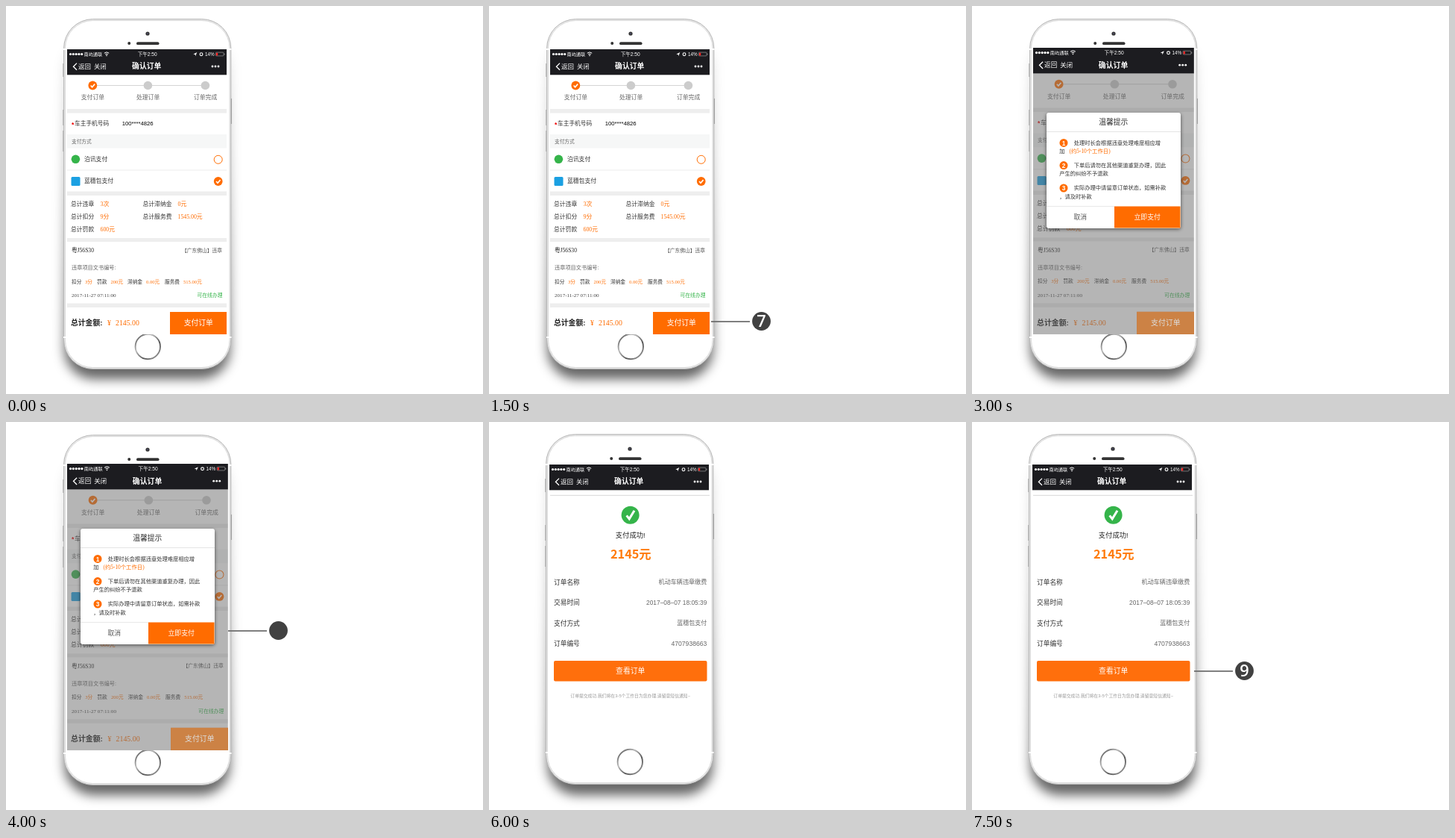
These frames come from a looping animation (640 px wide and 520 px high, 8 s). An HTML page:

```html
<!DOCTYPE html>
<html>
<head>
<meta charset="utf-8">
<style>
html, body { margin: 0; width: 100%; height: 100%; overflow: hidden; background: #fff; }
svg { display: block; }
text { font-family: "Liberation Sans", "Noto Sans CJK SC", "Noto Sans CJK", sans-serif; white-space: pre; }
.serif { font-family: "Liberation Serif", "Noto Sans CJK SC", "Noto Sans CJK", serif; }
.cjk { font-family: "Noto Sans CJK SC", "Noto Sans CJK", sans-serif; }
.digit { font-family: "Open Sans", "Noto Sans", sans-serif; font-weight: 600; }
</style>
</head>
<body>
<svg id="stage" width="640" height="520" viewBox="0 0 640 520"></svg>
<script>
const ORANGE = '#ff6c00', GREEN = '#35b44a', LOOP = 8000;

// y is the middle of the line of text
const text = (x, y, str, size, fill = '#333', anchor = 'start', cls = '', weight = 400) =>
  `<text x="${x}" y="${y + size * .37}" font-size="${size}" fill="${fill}" text-anchor="${anchor}" class="${cls}" font-weight="${weight}">${str}</text>`;
const mid = (x, y, str, size, fill, cls, weight) => text(x, y, str, size, fill, 'middle', cls, weight);
const end = (x, y, str, size, fill, cls) => text(x, y, str, size, fill, 'end', cls);
const price = (x, y, str, size) => text(x, y, str, size, ORANGE, 'start', 'serif');
const rect = (x, y, w, h, fill, extra = '') =>
  `<rect x="${x}" y="${y}" width="${w}" height="${h}" fill="${fill}" ${extra}/>`;
const dot = (x, y, r, fill, extra = '') => `<circle cx="${x}" cy="${y}" r="${r}" fill="${fill}" ${extra}/>`;
const path = (d, stroke, width, extra = '') =>
  `<path d="${d}" fill="none" stroke="${stroke}" stroke-width="${width}" ${extra}/>`;
const tick = (x, y, r, fill) => dot(x, y, r, fill) +
  path(`M${x - r * .45} ${y}l${r * .33} ${r * .38}l${r * .6} ${-r * .7}`, '#fff', r * .27);
const during = (from, to, content) => `<g data-from="${from}" data-to="${to}" display="none">${content}</g>`;
const move = (x, y, content) => `<g transform="translate(${x} ${y})">${content}</g>`;

const defs = `<defs>
  <filter id="blur" x="-20%" y="-20%" width="140%" height="140%"><feGaussianBlur stdDeviation="7.5"/></filter>
  <filter id="soft" x="-10%" y="-10%" width="120%" height="120%"><feGaussianBlur stdDeviation="2.5"/></filter>
  <linearGradient id="ring" x2="1" y2="1"><stop stop-color="#444"/><stop offset=".35" stop-color="#bbb"/>
    <stop offset=".65" stop-color="#555"/><stop offset="1" stop-color="#aaa"/></linearGradient>
  <linearGradient id="shade" x2="0" y2="1"><stop stop-opacity=".08"/><stop offset=".4" stop-opacity=".26"/>
    <stop offset="1" stop-opacity=".62"/></linearGradient>
</defs>`;

const shadow = rect(78, 44, 223, 456, 'url(#shade)', 'rx="40" filter="url(#blur)"');

const phone = [[77, 18], [139, 21], [167, 28]].map(([y, h]) => rect(76.3, y, 2, h, '#aaa')).join('') +
  rect(301, 124, 2, 34, '#999') +
  rect(77.6, 17.6, 224.2, 468.8, '#ececec', 'rx="39" stroke="#b4b4b4" stroke-width="1"') +
  rect(79.5, 19.5, 220.5, 465, '#fff', 'rx="37" stroke="#d2d2d2" stroke-width=".8"') +
  [57, 443].map(y => rect(77, y, 4, 2, '#fff') + rect(298.5, y, 4, 2, '#fff')).join('') +
  dot(190, 37, 2.6, '#333') + dot(190, 37, .9, '#557') + dot(165.2, 50, 2, '#333') +
  rect(175, 48.3, 30.5, 3.8, '#333', 'rx="1.9"') +
  dot(190.3, 456.5, 16.7, '#fff', 'stroke="url(#ring)" stroke-width="1.9"');

const header = rect(82, 58, 214, 34.3, '#1c1c20') +
  [0, 1, 2, 3, 4].map(i => dot(86.5 + i * 3.8, 64.5, 1.6, '#fff')).join('') +
  text(104.5, 64.5, '南屿通联', 6.2, '#fff') +
  path('M131.8 63.2q3.2 -2.6 6.4 0M133.2 64.9q1.8 -1.5 3.6 0', '#fff', 1) + dot(135, 66.4, .8, '#fff') +
  mid(189.7, 64.5, '下午2:50', 6.6, '#fff') +
  '<path d="M251.3 64.6l5 -2.5l-2.2 5.2l-.4 -2.4z" fill="#fff"/>' +
  dot(262, 64.7, 1.9, 'none', 'stroke="#fff" stroke-width="1.1"') +
  text(267, 64.5, '14%', 6.3, '#fff') +
  rect(281.4, 62.2, 10.6, 4.7, 'none', 'rx="1" stroke="#aaa" stroke-width=".6"') +
  rect(282, 62.8, 2.2, 3.5, '#f22') + rect(292.6, 63.6, .8, 2, '#aaa') +
  path('M95 76.6l-4.6 4.6l4.6 4.6', '#fff', 1.3) +
  text(97, 81, '返回', 8.5, '#fff') + text(118, 81, '关闭', 8.3, '#fff') +
  mid(188.7, 80.8, '确认订单', 9.8, '#fff', 'cjk', 700) +
  [277, 281, 285].map(x => dot(x, 81, 1.4, '#fff')).join('');

const payButton = (fill, ink) => rect(220, 410, 76, 30, fill) + mid(258.3, 424.8, '支付订单', 9.8, ink);

const bands = [[138, 5.5], [248.5, 5.5], [311, 5], [398.5, 5.5]]
  .map(([y, h]) => rect(82, y, 214, h, '#eee')).join('');

const steps = path('M122 106.5H262', '#d4d4d4', 1) + tick(116.3, 106.5, 5.9, ORANGE) +
  dot(190.4, 106.5, 5.8, '#ccc') + dot(267.4, 106.5, 5.8, '#ccc') +
  ['支付订单', '处理订单', '订单完成'].map((s, i) => mid([116.4, 190.6, 267.6][i], 122.5, s, 7.8, '#666')).join('');

const method = text(88, 158.5, '*', 8.5, '#e00', 'start', '', 700) + text(92, 157.5, '车主手机号码', 7.7) +
  text(155.7, 157.5, '100****4826', 7.7, '#000') +
  rect(82, 172, 214, 18.5, '#f6f7f7') + text(88, 181.3, '支付方式', 6.7, '#666') +
  dot(93.4, 205.3, 5.8, GREEN) + text(105, 205, '泊讯支付', 7.8) +
  dot(284.7, 205.8, 5.5, '#fff', `stroke="${ORANGE}" stroke-width="1"`) +
  rect(82, 219.5, 214, 1, '#eee') +
  rect(87.5, 229, 12, 12, '#1ba0e2', 'rx="1.5"') + text(105, 234.3, '蓝穗包支付', 7.8) +
  tick(284.7, 235, 5.9, ORANGE);

const totals = [['违章', '3次'], ['扣分', '9分'], ['罚款', '600元']].map(([label, v], i) =>
    text(87, 265.3 + i * 17, '总计' + label, 7.8) + price(126.5, 265.3 + i * 17, v, 7.8)).join('') +
  [['滞纳金', '0元'], ['服务费', '1545.00元']].map(([label, v], i) =>
    text(183.5, 265.3 + i * 17, '总计' + label, 7.8) + price(230.5, 265.3 + i * 17, v, 7.8)).join('');

const fees = [[88, '扣分', 106, '3分'], [122, '罚款', 140.5, '200元'], [163, '滞纳金', 188, '0.00元'], [213, '服务费', 238, '515.00元']]
  .map(([x, label, vx, v]) => text(x, 369.3, label, 6.7) + price(vx, 369.3, v, 6.6)).join('');

const record = text(88, 327.5, '粤J56S30', 7.6, '#222', 'start', 'serif') +
  end(290, 327.5, '【广东佛山】违章', 6.75, '#555') +
  text(88, 350.5, '违章项目文书编号:', 7.2, '#666') + fees +
  text(88, 387.3, '2017-11-27 07:11:00', 7.1, '#444', 'start', 'serif') +
  end(290.5, 387.5, '可在线办理', 6.8, GREEN);

const order = rect(82, 92, 214, 348, '#fff') + bands + steps + method + totals + record +
  text(87, 424.8, '总计金额:', 9.8, '#222', 'start', '', 700) +
  price(136, 424.8, '¥', 9.8) + price(147, 424.8, '2145.00', 9.8) + payButton(ORANGE, '#fff');

const tips = [
  [183.4, '处理时长会根据违章处理难度相应增', '加'],
  [213.6, '下单后请勿在其他渠道重复办理，因此', '产生的纠纷不予退款'],
  [244, '实际办理中请留意订单状态，如需补款', '，请及时补款']
].map(([y, a, b], i) => dot(123, y, 5.5, ORANGE) + mid(123, y, i + 1, 8.4, '#fff', '', 700) +
  text(136.8, y - .5, a, 7.28) + text(117.3, y + 11, b, 7.28)).join('');

const dialog = rect(100, 145, 180, 154, '#000', 'rx="3" opacity=".6" filter="url(#soft)"') +
  rect(100, 143, 180, 155, '#fff', 'rx="3"') + mid(189.8, 155.3, '温馨提示', 9.8) +
  rect(100, 168, 180, 1, '#e4e4e4') + tips + price(130.5, 194.4, '(约5-10个工作日)', 7.35) +
  rect(100, 268, 91, .8, '#e4e4e4') + mid(145.3, 282.7, '取消', 8.8, '#555') +
  rect(191, 268.5, 88.5, 29, ORANGE) + mid(235.2, 282.7, '立即支付', 8.9, '#fff');

// The confirm step shows the same screen very slightly larger
const dimmed = `<g transform="translate(82 440) scale(1.0085 1.0052) translate(-82 -440)">${order}${header}` +
  rect(82, 92.3, 214, 347.7, 'rgba(108,108,108,.5)') + payButton('#cc8245', '#ddd') + '</g>' + dialog;

const rows = [
  ['订单名称', '机动车辆违章缴费', 8.1], ['交易时间', '2017–08–07 18:05:39', 8.35],
  ['支付方式', '蓝穗包支付', 8], ['订单编号', '4707938663', 8.6]
].map(([label, v, size], i) => text(87, 214.5 + i * 27.5, label, 8.7) +
  end(292.3, 214.5 + i * 27.5, v, size, '#666')).join('');

const success = rect(82, 97.8, 214, 1, '#d8d8d8') +
  dot(189.6, 124.7, 12, GREEN) + path('M184.6 125.4l3.6 4.4l6.8 -11', '#fff', 3) +
  mid(189.7, 152, '支付成功!', 9.3, '#222') + mid(190.3, 176.8, '2145元', 16.3, '#ff7a0a', 'cjk', 700) + rows +
  rect(87, 320, 205.5, 27.5, '#ff6f0c', 'rx="2"') + mid(189.7, 333.8, '查看订单', 9.8, '#fff') +
  mid(189.7, 366.5, '订单提交成功,我们将在3-5个工作日为您办理,请留意短信通知~', 5.83, '#999');

// Line, disc, digit and caption appear one after another
const callout = (start, stop, y, digit, caption = '') => [
  rect(298, y - .4, 52, 1.7, '#6a6a6a'),
  dot(365.5, y, 12.4, '#414141'),
  mid(365.5, y - .1, digit, 21.8, '#fff', 'digit'),
  caption
].map((part, i) => during(start + 500 * (i + 1), stop, part)).join('');

const caption = (x, y, str) => mid(x, y, str, 21, '#444', 'cjk');

const stage = document.getElementById('stage');
stage.innerHTML = defs + shadow +
  during(0, 3000, phone + order + header) +
  during(3000, 6000, phone + dimmed) +
  during(6000, LOOP, move(-1, -1, phone + header) + success) +
  callout(0, 3000, 422.5, 7, caption(496.5, 424.5, '选择泊讯或蓝穗包') + caption(496.5, 460.3, '支付订单款项')) +
  callout(3000, 6000, 279.5, 8, caption(466.3, 282.3, '点击立即支付')) +
  callout(6000, LOOP, 333.5, 9);

const parts = [...stage.querySelectorAll('[data-from]')];
function draw() {
  const t = performance.now() % LOOP;
  for (const p of parts) {
    p.setAttribute('display', t >= +p.dataset.from && t < +p.dataset.to ? 'inline' : 'none');
  }
  requestAnimationFrame(draw);
}
draw();
</script>
</body>
</html>
```
